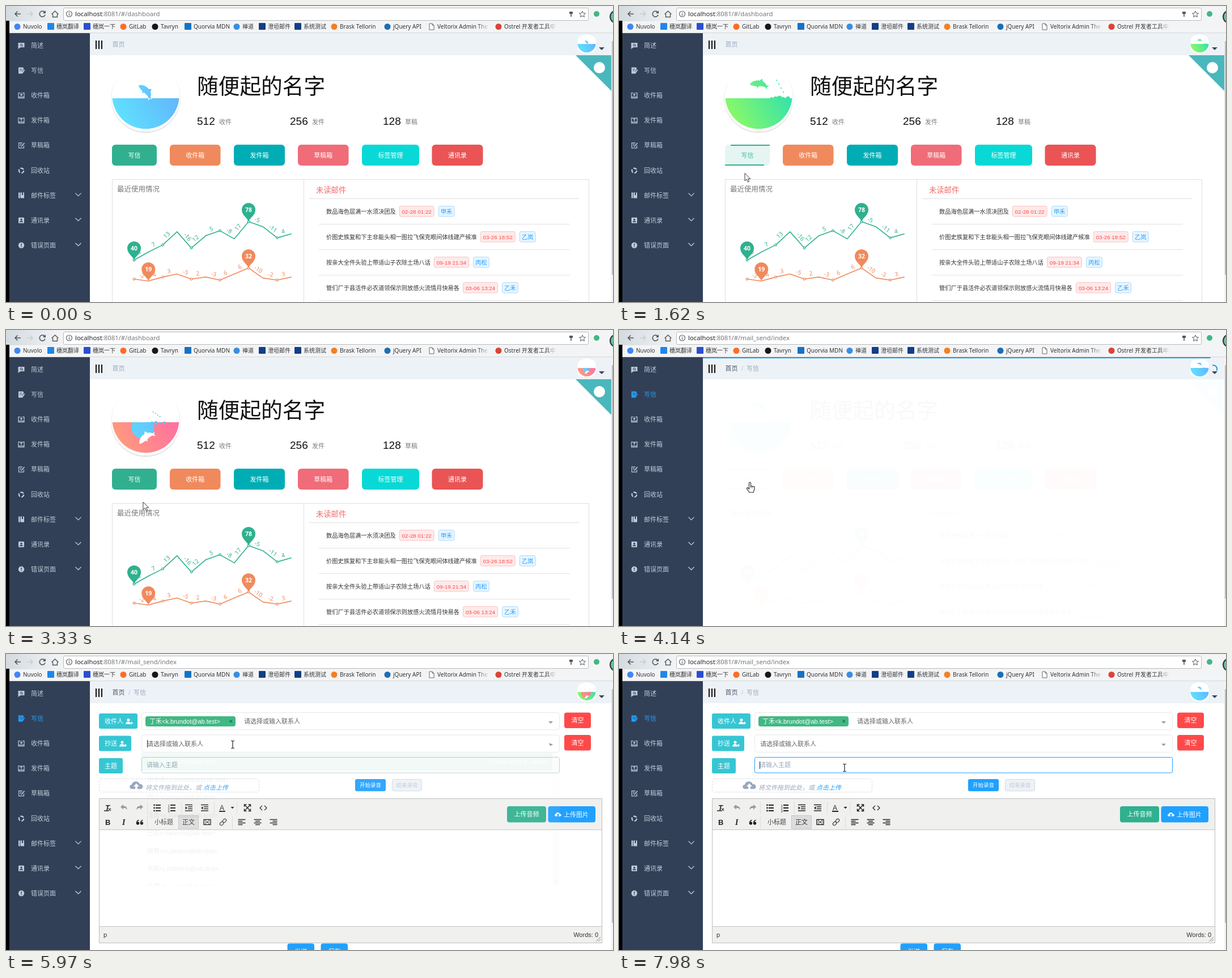
These frames come from a looping animation (1071x523 px, 8000 ms). An HTML page:

```html
<!DOCTYPE html>
<html lang="zh">
<head>
<meta charset="utf-8">
<title>Mail</title>
<style>
html,body{margin:0;width:100%;height:100%;overflow:hidden;background:#fff}
svg{display:block;width:1071px;height:523px;font-family:"Liberation Sans","Noto Sans CJK SC","Noto Sans CJK JP",sans-serif}
.ui{font-family:"Noto Sans","Noto Sans CJK SC","Noto Sans CJK JP",sans-serif}
text{white-space:pre}
</style>
</head>
<body>
<svg id="stage" viewBox="0 0 1071 523" xmlns="http://www.w3.org/2000/svg"></svg>
<script>
const LOOP = 8000, JUMP = 1300, CLICK = 3850;
const $ = id => document.getElementById(id);
const clamp = x => Math.max(0, Math.min(1, x));
const ramp = (t, from, span) => clamp((t - from) / span);
const ease = x => 1 - (1 - x) ** 3 * (1 + 2 * x);
const smooth = x => x * x * (3 - 2 * x);

// ---- markup helpers
const text = (x, y, s, size = 11, fill = '#fff', more = '') =>
  `<text x="${x}" y="${y}" font-size="${size}" fill="${fill}" ${more}>${s.replace(/</g, '&lt;')}</text>`;
const rect = (x, y, w, h, fill, r = 0, more = '') =>
  `<rect x="${x}" y="${y}" width="${w}" height="${h}" rx="${r}" fill="${fill}" ${more}/>`;
const circle = (x, y, r, fill, more = '') => `<circle cx="${x}" cy="${y}" r="${r}" fill="${fill}" ${more}/>`;
const path = (d, fill = 'none', more = '') => `<path d="${d}" fill="${fill}" ${more}/>`;
const line = (d, color, w = 1, more = '') => path(d, 'none', `stroke="${color}" stroke-width="${w}" ${more}`);
const group = (id, body, more = '') => `<g id="${id}" ${more}>${body}</g>`;
const at = (x, y, body) => `<g transform="translate(${x} ${y})">${body}</g>`;
const mid = 'text-anchor="middle"', end = 'text-anchor="end"';
const button = (x, y, w, h, s, fill, size = 11, r = 4) =>
  rect(x, y, w, h, fill, r) + text(x + w / 2, y + h / 2 + size * .37, s, size, '#fff', mid);

// ---- browser frame
function browser() {
  const marks = [
    [20, 'Nuvolo', '#4285f4'], [79, '穗岚翻译', '#1f87e8', 1], [143, '穗岚一下', '#2b4fd0', 1], [207, 'GitLab', '#fc6d26'],
    [263, 'Tavryn', '#181717'], [321, 'Quorvia MDN', '#1672c4', 1], [407, '禅道', '#3a8ee0'], [452, '澄垣邮件', '#123f86', 1],
    [515, '系统测试', '#123f86', 1], [579, 'Brask Tellorin', '#f48024'], [673, 'jQuery API', '#1b6fb5'],
    [751, 'Veltorix Admin The', ''], [869, 'Ostrel 开发者工具中', '#db4437']];
  const doc = x => path(`M${x - 4} 31h5l3 3v8h-8zM${x + 1} 31v3h3`, '#fff', 'stroke="#666"');
  const bar = marks.map(([x, s, c, sq]) =>
    (!c ? doc(x) : sq ? rect(x - 6, 30, 12, 12, c, 1) : circle(x, 36.5, 5.5, c)) + text(x + 10, 40, s, 10, '#333')).join('');
  const fade = x => rect(x, 28, 22, 18, 'url(#fade)') + rect(x + 22, 28, x > 900 ? 80 : 6, 18, '#f3f4f6');
  return `<g class="ui">${rect(0, 0, 1071, 48, '#f3f4f6')}${rect(0, 0, 101, 27, 'url(#tint)')}${rect(0, 26, 6, 22, '#000')}
    ${line('M26 14H16M20.500 9.500L16 14l4.500 4.500', '#555', 1.6)}${line('M37 14h10M42.500 9.500L47 14l-4.500 4.500', '#ccc', 1.6)}
    ${line('M68.500 11.500a5 5 0 1 0 .5 4', '#555', 1.6)}${path('M70 8v5h-5z', '#555')}
    ${line('M80.500 14.500l6-5.500 6 5.500M82.500 14v5.500h8V14', '#555', 1.4)}
    ${rect(101.5, 3.5, 926, 22, '#fff', 2, 'stroke="#b8b9bb"')}
    ${circle(111.5, 14, 5, 'none', 'stroke="#666" stroke-width="1.2"')}${line('M111.500 11v1.500M111.500 13.500v3.500', '#666', 1.3)}
    <text x="122" y="18" font-size="11.3" fill="#777"><tspan fill="#222">localhost</tspan>:8081/#/<tspan id="route"></tspan></text>
    ${rect(994, 10, 6, 4, '#555', 1)}${line('M997 13v6', '#555', 1.6)}
    ${path('M1017 9l1.600 3.600 3.900.4-2.900 2.600.8 3.900-3.400-2-3.400 2 .8-3.900-2.900-2.600 3.900-.4z', 'none', 'stroke="#555"')}
    ${circle(1042, 14, 5, '#41b883')}${circle(1077, 19, 11, '#5cc7a8', 'stroke="#333" stroke-width="2"')}
    ${bar}${fade(831)}${fade(950)}${line('M6 47.500H1071', '#d5d7da')}</g>`;
}

// ---- page frame
function sidebar() {
  const names = ['简述', '写信', '收件箱', '发件箱', '草稿箱', '回收站', '邮件标签', '通讯录', '错误页面'];
  const ink = 'currentColor', dark = '#324057';
  const tray = arrow => line('M-2 -4.500h-3v9h10v-9h-3M-5 2.500H5', ink, 1.2) + line(arrow, ink, 1.3);
  const icons = [
    path('M-5.500 -5h11v8h-7l-4 3z', ink) + circle(0, -1.2, 1.8, 'none', `stroke="${dark}"`) + line('M1 0l2 1.500', dark),
    path('M-5 -5.500H3l1.500 2-3 5 .5 4h-7z', ink) + line('M-3 -2.500H1.500M-3 0H1', dark, .8) + line('M5.500 -1.500L1.500 4.500', ink, 2),
    tray('M0 -5v5M-2 -2l2 2 2-2'), tray('M0 1v-5M-2 -2.500l2-2 2 2'),
    line('M2 -4.500h-6.500v9h9V0M-2.500 -2h3M-2.500 .5h2', ink, 1.1) + line('M5.500 -4.500L0 2', ink, 1.6),
    circle(0, .3, 4.200, 'none', `stroke="${ink}" stroke-width="2.2" stroke-dasharray="6.3 2.500"`),
    path('M-5 -5h2.500v10H-5zM-1.500 -5H5V5h-6.500z', ink) + path('M1 -5h2v5l-1-1-1 1z', dark),
    rect(-5, -5, 10, 10, ink, 1) + circle(0, -1.400, 1.600, dark) + path('M-3 3c0-3 6-3 6 0z', dark),
    circle(0, 0, 5.2, ink) + line('M0 -3v3.500M0 1.700v1.500', dark, 1.5)];
  return rect(0, 48, 6, 475, '#000') + rect(6, 48, 142, 475, dark) + names.map((s, i) => {
    const y = 70 + 44.1 * i;
    return group('nav' + i, at(27, y, icons[i]) + text(44, y + 4, s, 11, ink) +
      (i > 5 ? line(`M122.500 ${y - 4}l5 5 5-5`, '#bfcbd9', 1.3) : ''), 'color="#bfcbd9"');
  }).join('');
}

function header() {
  const bars = [158, 163, 168].map(x => rect(x, 61, 2, 15, '#111')).join('');
  return rect(148, 48, 920, 39, '#edf2f7') + bars +
    group('crumbs', text(216, 72, '/', 11, '#b6c2d0') + text(225, 72, '写信', 11, '#97a8be')) +
    text(187.5, 72, '首页', 11, '#97a8be', 'id="home"') +
    rect(1008.5, 52, 32, 31, '#fff', 9) + '<use href="#scene" transform="translate(1024.500 67) scale(.271)"/>' +
    path('M1046 73h10l-5 5z', '#3c4756') +
    rect(1068, 48, 3, 475, '#f3f3f3') + rect(1069, 62, 2, 413, '#bcbcbc') +
    group('progress', rect(148, 48, 100, 2, '#2299dd', 0, 'id="bar"') +
      line('M1047 62.500a6.500 6.500 0 0 1 7.500 9', '#2299dd', 2, 'id="spinner"'));
}

// ---- dolphin picture, waterline near y = 0
const waters = [['#5fe3ff', '#62b8fc'], ['#8ffa63', '#38e3a8'], ['#ff9c7c', '#fe729f']];
function sceneDefs() {
  const fish = 'M-17 2C-13 -5 -6 -8 2 -7L6 -11 8 -5C12 -3 14 0 15 3L20 3 16 6 16 11 12 6C6 4 4 5 0 5L-2 9 -4 5C-9 5 -13 4 -17 2Z';
  const grads = waters.map(([a, b], i) => `<linearGradient id="water${i}" gradientUnits="userSpaceOnUse" x1="-50" y1="45" x2="45" y2="-10">
    <stop stop-color="${a}"/><stop offset="1" stop-color="${b}"/></linearGradient>`).join('');
  const clip = (id, shape) => `<clipPath id="${id}">${shape}</clipPath>`;
  return `<defs>${grads}
    <linearGradient id="fade"><stop stop-color="#f3f4f6" stop-opacity="0"/><stop offset="1" stop-color="#f3f4f6"/></linearGradient>
    <linearGradient id="tint"><stop stop-color="#d3dbe0"/><stop offset="1" stop-color="#f3f4f6"/></linearGradient>
    <filter id="shadow" x="-20%" y="-20%" width="140%" height="140%"><feDropShadow dx="0" dy="1" stdDeviation="1.2" flood-opacity=".25"/></filter>
    ${clip('disc', circle(0, -4, 59))}${clip('air', rect(-60, -60, 120, 61))}${clip('sea', rect(-60, 1, 120, 60))}
    ${clip('spread', circle(-5, 10, 80, '', 'id="spreadDisc"'))}
    <g id="scene"><g clip-path="url(#disc)">${circle(0, -4, 59, '#fff')}
      ${rect(-60, 1, 120, 60, '', 0, 'id="oldSea"')}
      <g clip-path="url(#spread)">${rect(-60, 1, 120, 60, '', 0, 'id="newSea"')}</g>
      <g id="splash"></g>
      <g clip-path="url(#air)">${path(fish, '', 'class="fish" id="flyer"')}</g>
      <g clip-path="url(#sea)">${path(fish, '#fff', 'class="fish"')}</g></g></g></defs>`;
}

function drawScene(t) {
  const k = Math.floor((t + 640) / JUMP), u = (t + 640) % JUMP - 640;
  const paint = i => `url(#water${(i + 3) % 3})`;
  const grow = ramp(u, -640, 300);
  $('oldSea').setAttribute('fill', paint(grow < 1 ? k - 1 : k));
  $('newSea').setAttribute('fill', paint(k));
  $('spreadDisc').setAttribute('r', grow * 85);
  $('flyer').setAttribute('fill', paint(k));
  const w = 2 * Math.PI / JUMP, c = Math.cos(w * (u - 230));
  const y = -c * (c > 0 ? 27 : 37), tilt = -43 * Math.sin(w * (u - 330));
  document.querySelectorAll('.fish').forEach(f => f.setAttribute('transform', `translate(0 ${y}) rotate(${tilt}) scale(.93 .85)`));
  const splash = age => {
    if (age < 0 || age > 700) return '';
    const x = 4 + age * .1, h = Math.sin(Math.PI * age / 700);
    const bumps = [-13, -6, 1, 8, 16].map((d, i) => circle(x + d, 2, (3 + i % 3 * 1.3) * h, paint(k)));
    const drops = [0, 1, 2, 3].map(i => circle(x - 4 + i * 4, 1 - (.17 - i * .022) * age + .00022 * age * age, 1.1, paint(k)));
    return bumps.join('') + drops.join('');
  };
  $('splash').innerHTML = splash(u - 5) + splash(u < 0 ? u + JUMP - 600 : u - 600);
}

// ---- dashboard
const received = [40, 48, 55, 68, 52, 64, 69, 61, 78, 73, 62, 66];
const sent = [21, 19, 23, 26, 21, 23, 20, 26, 32, 22, 20, 23];
const GREEN = '#30b08f', ORANGE = '#f08a5d', BLUE = '#20a0ff';
const px = i => 226 + 25.25 * i;
const receivedY = v => 520.6 - 1.79 * v, sentY = v => 519.6 - 1.77 * v;

function series(values, toY, color, pins) {
  const pts = values.map((v, i) => [px(i), toY(v)]);
  const labels = pts.slice(1).map(([x, y], i) => {
    const [a, b] = pts[i], turn = Math.atan2(y - b, x - a) * 180 / Math.PI;
    return `<g transform="translate(${(a + x) / 2} ${(b + y) / 2}) rotate(${turn})">${text(0, -4.5, String(values[i + 1] - values[i]), 10.3, color, mid)}</g>`;
  });
  const dots = pts.filter((_, i) => i % 2 == 0).map(([x, y]) => circle(x, y, 1.8, '#fff', `stroke="${color}" stroke-width="1.3"`));
  const marks = pins.map(i => at(...pts[i],
    path('M0 0C-2 -7 -12 -11 -12 -21A12 12 0 0 1 12 -21C12 -11 2 -7 0 0Z', color) + text(0, -17, String(values[i]), 10.5, '#fff', mid + ' font-weight="600"')));
  return `<g class="ui">${line('M' + pts.join('L'), color, 1.6, 'stroke-linejoin="round"')}${[...labels, ...dots, ...marks].join('')}</g>`;
}

function dashboard() {
  const stats = [[337, '512', '收件'], [501, '256', '发件'], [665, '128', '草稿']].map(([x, n, s]) =>
    text(x, 210, n, 19, '#111') + text(x + 39, 209, s, 11, '#7d7d7d')).join('');
  const buttons = [[289, 89.5, '收件箱', ORANGE], [402, 90, '发件箱', '#00adb5'], [515, 89.5, '草稿箱', '#ef6c78'],
    [628, 101, '标签管理', '#08d9d6'], [751.5, 90, '通讯录', '#ea5455']].map(([x, w, s, c]) => button(x, 245, w, 37, s, c, 11, 6)).join('');
  const mails = [['数品海色层满一水须决团及', '02-28 01:22', '甲禾'], ['价图史族复和下主非能头相一图拉飞保克眼间体线建产候准', '03-26 18:52', '乙岚'],
    ['按亲大全件头验上带适山子农除土场八话', '09-19 21:34', '丙松'], ['管们厂于县活件必农道领保示则放感火流情月快易各', '03-06 13:24', '乙禾']]
    .map(([s, date, who], i) => {
      const y = 363 + 45 * i, x = 571.5 + 10.22 * s.length;
      return text(565, y + 3.5, s, 10.22, '#333') +
        rect(x, y - 9.5, 61, 18.5, '#feeaea', 3, 'stroke="#fcc3c3"') + text(x + 30.5, y + 3.5, date, 9.8, '#ff4949', mid) +
        rect(x + 69, y - 9.5, 28, 18.5, '#e6f4ff', 3, 'stroke="#b0dcff"') + text(x + 83, y + 3.5, who, 10.2, BLUE, mid) +
        line(`M552 ${y + 22.5}H995`, '#e2e2e2');
    }).join('');
  const corner = path('M1005 87H1068V150Z', '#4ab7bd') + circle(1047, 109, 10, '#fff');
  return circle(246.500, 162, 60, '#fff', 'filter="url(#shadow)"') + '<use href="#scene" transform="translate(246.500 162)"/>' +
    text(337, 155.3, '随便起的名字', 37.7, '#111', 'font-weight="350"') + stats +
    rect(187, 245, 79, 37, GREEN, 6, 'id="write"') + rect(187, 245, 0, 2, GREEN, 0, 'id="edgeTop"') + rect(187, 280, 0, 2, GREEN, 0, 'id="edgeLow"') +
    text(226.5, 268, '写信', 11, '#fff', mid + ' id="writeLabel"') + buttons +
    line('M187.500 530V306.500H1028.500V530M525.500 306V530', '#dfdfdf') + text(196, 328, '最近使用情况', 12.5, '#777') +
    text(547, 329.500, '未读邮件', 13.300, '#f56c6c') + line('M535 340.500H1011', '#dfdfdf') + mails +
    series(received, receivedY, GREEN, [0, 8]) + series(sent, sentY, ORANGE, [1, 8]) + corner +
    group('tip', line('M0 378V520', '#777', 1, 'id="axis"') +
      circle(0, 0, 3.5, '#fff', `stroke="${GREEN}" id="hot0"`) + circle(0, 0, 3.5, '#fff', `stroke="${ORANGE}" id="hot1"`) +
      group('tipBox', rect(0, 0, 74, 58, 'rgba(50,50,50,.72)', 3) + text(3, 17, '', 11, '#fff', 'id="week"') +
        circle(7.500, 29.500, 3.800, GREEN) + circle(7.500, 46, 3.800, ORANGE) +
        text(14, 33.5, '', 11, '#fff', 'id="tip0"') + text(14, 50, '', 11, '#fff', 'id="tip1"')));
}

// ---- mail form
const people = ['丁禾<k.brundot@ab.test>', '申木岚<u.fenoltarip@ab.test>', '丙川<l.worpedi@ab.test>', '戊青<a.dulmok@ab.test>',
  '己石<i.tarvosk@ab.test>', '庚林<m.pelduri@ab.test>', '辛松<j.zolbetrin@ab.test>', '壬荷<t.nuvrog@ab.test>'];
const HINT = '请选择或输入联系人';
const cloud = 'M-8 5.500C-13 5 -13 -2 -8 -2C-7 -9 4 -10 6 -3C13 -4 13 5 8 5.500H2V1H5L0 -4.500 -5 1H-2V5.500Z';

function field(id, y, label, w) {
  const person = circle(-1, -2.600, 2.500, '#fff') + path('M-6 5c0-6 9-6 9 0z', '#fff') + line('M2 3h5M4.500 .5v5', '#fff', 1.4);
  return rect(164, y + 1.5, w, 27, '#36c6d3', 3) + text(174, y + 19, label) + at(164 + w - 15, y + 15.5, person) +
    rect(239.5, y, 737, 30.5, '#fff', 4, 'stroke="#e8e8e8"') +
    group(id + 'Tag', rect(246, y + 6.500, 159, 18, '#41b883', 4) + text(253, y + 19.200, people[0]) +
      line(`M394.500 ${y + 13}l4.500 4.500m0 -4.500l-4.500 4.500`, '#266d4d', 1.2)) +
    text(249, y + 19.500, HINT, 11, '#666', `id="${id}Hint"`) +
    line(`M249.500 ${y + 9}v13`, '#222', 1, `id="${id}Caret"`) +
    path('M-4 -2h8l-4 4z', '#999', `id="${id}Arrow"`) + button(985, y, 47, 27.5, '清空', '#ff4949');
}

function dropdown(id, y) {
  const options = people.map((s, i) => text(249, y + 19.5 + 31.5 * i, s, 11, i ? '#35495e' : '#fff')).join('');
  return group(id + 'List', `<clipPath id="${id}Clip">${rect(239, y, 738, 235)}</clipPath><g clip-path="url(#${id}Clip)">` +
    rect(239.500, y - 1, 737, 235.5, '#fff', 4, 'stroke="#e8e8e8"') + rect(239, y, 725, 31.5, '#41b883') + options +
    text(954, y + 19.500, 'Press enter to select', 11, '#fff', end) + rect(964, y, 12, 235, '#f1f1f1') +
    rect(965.500, y + 13, 9.500, 17, '#c1c1c1') + path(`M967 ${y + 8}h6l-3-3zM967 ${y + 227}h6l-3 3z`, '#666') + '</g>');
}

function toolbar() {
  const ink = '#222';
  const arrow = (x, flip) => `<g transform="translate(${x} 271) scale(${flip} 1)">${path('M-6 -1l5-4v2.500c5 0 7 3 6.500 7-1.500-3-3-3.500-6.500-3.500v3z', '#999')}</g>`;
  const list = x => line(`M${x - 2} 267h9m-9 5h9m-9 5h9`, ink, 1.8);
  const dent = (x, d) => line(`M${x - 6} 266.500h13m-8 3.500h8m-8 3.500h8m-13 3.500h13`, ink, 1.5) + path(`M${x - 4 - d * 2} 272l${d * 3.5}-3v6z`, ink);
  const align = (x, a) => line([0, 1, 2, 3].map(i =>
    `M${x - 6.5 + i % 2 * a * 2.5} ${292.5 + i * 3}h${i % 2 ? 8 : 13}`).join(''), ink, 1.6);
  const link = x => rect(x, -2.5, 7, 5, 'none', 2.5, 'stroke="#555" stroke-width="1.4"');
  const quote = x => circle(x, 299, 2.7, ink) + line(`M${x - 2} 299c0-4 2-5 4-5.500`, ink, 1.5);
  const seps = line('M249.500 261v22M309.500 261v22M367.500 261v22M407.500 261v22M249.500 287v22M399.500 287v22', '#dcdcdc');
  return seps + text(175, 276, 'T', 13, ink, 'font-style="italic" font-weight="bold"') + line('M173 277h8M181 273l4 4m0-4l-4 4', ink, 1.3) +
    arrow(208, 1) + arrow(236, -1) + list(266) + list(292) +
    [0, 1, 2].map(i => circle(261.5, 267 + 5 * i, 1.4, ink) + text(285.5, 269.5 + 5 * i, String(i + 1), 6, ink)).join('') +
    dent(322, -1) + dent(350, 1) + text(381, 275.500, 'A', 12, ink, mid) + rect(376, 277, 11, 2, ink) + path('M396.500 270h6l-3 3.500z', ink) +
    line('M420.500 270v-4h4m3 0h4v4m0 3.500v4h-4m-3 0h-4v-4M421 266.500l10 10.500m0-10.500l-10 10.500', ink, 1.5) +
    line('M452 268l-4 4 4 4m4-8l4 4-4 4', ink, 1.3) +
    text(175, 302, 'B', 13, ink, 'font-weight="bold"') +
    text(205, 302, 'I', 14, ink, 'font-style="italic" font-weight="bold" font-family="Liberation Serif,serif"') +
    quote(232.5) + quote(239.5) +
    text(262, 301, '小标题', 11, '#444') + rect(304.500, 285.500, 35, 23, '#dcdcdc', 0, 'stroke="#c6c6c6"') + text(322, 301, '正文', 11, '#333', mid) +
    rect(349, 292.500, 12, 9, 'none', 0, `stroke="${ink}" stroke-width="1.4"`) +
    line('M352 293v8m6-8v8', ink, 1.2, 'stroke-dasharray="2 1"') + path('M354 295l3 2-3 2z', ink) +
    `<g transform="translate(383 297) rotate(-45)">${link(-7)}${link(0)}</g>` +
    align(416, 0) + align(444, 1) + align(472, 2);
}

function mailForm() {
  const slant = 'font-style="italic"';
  return field('to', 103.5, '收件人', 68) + field('cc', 143, '抄送', 57) + button(164, 184, 42, 27, '主题', '#36c6d3', 11, 3) +
    rect(239.5, 182.5, 737, 27.5, '#fff', 3, 'id="subject" stroke="#c0ccda"') + text(248, 200, '请输入主题', 11, '#97a8be') +
    line('M248.500 190v13', '#222', 1, 'id="subjectCaret"') +
    rect(164.5, 220.5, 282, 23.5, '#fff', 4, 'stroke="#d9d9d9" stroke-dasharray="3 2"') + at(230, 233, path(cloud, '#97a8be')) +
    text(246, 240, '将文件拖到此处，或', 11, '#97a8be', slant) + text(348, 240, '点击上传', 11, BLUE, slant) +
    button(616, 221, 54, 21.5, '开始录音', BLUE, 9.5, 3) +
    rect(681.5, 221.5, 52, 20.5, '#eef1f6', 3, 'stroke="#d1dbe5"') + text(707.5, 235, '结束录音', 9.5, '#bfcbd9', mid) +
    rect(164.5, 255.5, 887, 255, '#fff', 0, 'stroke="#bdbdbd"') + rect(165, 256, 886, 54.500, '#f0f0ef') + rect(165, 482, 886, 28, '#f0f0ef') +
    line('M165 310.500H1051M165 481.500H1051', '#c4c4c4') + toolbar() +
    button(884, 269, 69, 28.5, '上传音频', GREEN) + rect(956.500, 269, 83.500, 28.500, BLUE, 4) + text(984, 287.500, '上传图片') +
    `<g transform="translate(974 284) scale(.5)">${path(cloud, '#fff')}</g>` +
    text(172, 500, 'p', 11, '#333') + text(1045, 500, 'Words: 0', 11, '#333', end) + line('M1041 508l8-8m-4 8l4-4', '#888') +
    button(496.5, 511.5, 47.5, 28, '发送', BLUE) + button(555.5, 511.5, 47.5, 28, '保存', BLUE) +
    dropdown('to', 135) + dropdown('cc', 174.5);
}

const pointers = group('arrow', path('M0 0V13.500L3.200 10.600 5.400 15.600 7.600 14.600 5.500 9.800H9.800Z', '#fff', 'stroke="#222" stroke-width=".9"')) +
  group('hand', path('M-1.500 1.500C-1.500 -.6 1.500 -.6 1.500 1.500V6.500L8 8V12L6 18H-1L-5.500 11.500C-6 9.500 -4 9 -3 10.500L-1.500 12Z', '#fff', 'stroke="#222" stroke-width="1.1"') + line('M1.500 7v3M4 7.500v3', '#222', .8)) +
  group('beam', line('M-3 -6.500h2.200l.8 1 .8-1H3M-3 6.500h2.200l.8-1 .8 1H3M0 -6V6', '#222', 1.2));

$('stage').innerHTML = sceneDefs() + rect(0, 0, 1071, 523, '#fff') + group('dash', dashboard()) + group('mail', mailForm()) +
  sidebar() + header() + browser() + group('pointer', pointers);

// ---- motion
const route = [[450, 600, 530], [840, 560, 470], [930, 440, 300], [1000, 236, 268], [1500, 230, 272], [1620, 222, 295.5], [2340, 320, 393],
  [2700, 420, 430], [3000, 330, 440], [3250, 250, 330], [3430, 231, 269], [4250, 231, 269], [4900, 386, 119], [5300, 386, 119],
  [5500, 330, 151], [5650, 330, 151], [5900, 400, 160], [6050, 400, 160], [6250, 340, 190], [6450, 340, 190], [6700, 466, 159],
  [6850, 466, 159], [7200, 1008, 158], [7400, 1008, 158], [7780, 398, 201], [8000, 398, 201]];
function pointerAt(t) {
  const i = route.findIndex(p => p[0] > t);
  if (i < 1) return [600, 540];
  const [t0, x0, y0] = route[i - 1], [t1, x1, y1] = route[i], f = smooth((t - t0) / (t1 - t0));
  return [x0 + (x1 - x0) * f, y0 + (y1 - y0) * f];
}

const set = (id, attrs) => { for (const a in attrs) $(id).setAttribute(a, attrs[a]); };
const show = (id, amount) => set(id, { opacity: +amount });

function drawTip(x, y) {
  const on = y > 345 && y < 500 && x > 215 && x < 510;
  show('tip', on);
  if (!on) return;
  const i = Math.round((x - 226) / 25.25);
  set('axis', { transform: `translate(${Math.round(x) - .5} 0)` });
  set('hot0', { cx: px(i), cy: receivedY(received[i]) });
  set('hot1', { cx: px(i), cy: sentY(sent[i]) });
  set('tipBox', { transform: `translate(${x + 6} ${y + 16})` });
  $('week').textContent = String(i + 1).padStart(2, '0') + '周';
  $('tip0').textContent = '收件数 : ' + received[i];
  $('tip1').textContent = '发件数 : ' + sent[i];
}

function drawHover(h) {
  const mix = (a, b) => Math.round(a + (b - a) * h);
  set('write', { fill: `rgb(${mix(48, 255)},${mix(176, 255)},${mix(143, 255)})` });
  set('writeLabel', { fill: `rgb(${mix(255, 48)},${mix(255, 176)},${mix(255, 143)})` });
  set('edgeTop', { x: 266 - 79 * h, width: 79 * h });
  set('edgeLow', { width: 79 * h });
}

function drawField(id, y, open, tagged) {
  show(id + 'List', open);
  show(id + 'Tag', tagged);
  set(id + 'Hint', { x: tagged ? 420 : 249 });
  show(id + 'Caret', open > 0 && !tagged);
  set(id + 'Arrow', { transform: `translate(961 ${y + 17.5}) rotate(${180 * open})` });
}

function draw(t) {
  const [x, y] = pointerAt(t), second = t >= CLICK;
  drawScene(t);
  drawHover(t < 3000 ? ease(ramp(t, 960, 500)) * (1 - ease(ramp(t, 1560, 600))) : ease(ramp(t, 3400, 450)));
  drawTip(x, second ? 0 : y);
  show('dash', 1 - ease(ramp(t, CLICK, 370)));
  show('mail', ease(ramp(t, 4180, 300)));

  $('route').textContent = second ? 'mail_send/index' : 'dashboard';
  set('nav1', { color: second ? BLUE : '#bfcbd9' });
  show('crumbs', second);
  set('home', { fill: second ? '#48576a' : '#97a8be' });
  show('progress', second ? 1 - ramp(t, 4230, 200) : 0);
  set('bar', { width: 920 * (.2 * ramp(t, CLICK, 80) + .8 * ease(ramp(t, 3950, 250))) });
  set('spinner', { transform: `rotate(${(t - 4140) * .9} 1049 69)` });

  const toOpen = ramp(t, 5165, 150) * (1 - ramp(t, 5580, 150)), ccOpen = ramp(t, 5960, 150) * (1 - ramp(t, 6370, 150));
  drawField('to', 103.5, toOpen, t > 5580);
  drawField('cc', 143, ccOpen, t > 6370 && t < 7300);
  const typing = t > 7820;
  set('subject', { stroke: typing ? BLUE : '#c0ccda' });
  show('subjectCaret', typing);

  const onList = (toOpen > 0 && y > 135) || (ccOpen > 0 && y > 175);
  const onField = t > 4400 && x > 239 && x < 977 && ((y > 103 && y < 134) || (y > 143 && y < 174) || (y > 182 && y < 210));
  const onButton = t < 4250 ? x > 187 && x < 266 && y > 245 && y < 282 : x > 985 && y < 171;
  const kind = onList || onButton ? 'hand' : onField ? 'beam' : 'arrow';
  ['arrow', 'hand', 'beam'].forEach(k => show(k, k == kind));
  set('pointer', { transform: `translate(${x} ${y})` });
}

const start = performance.now();
function frame(now) {
  draw(Math.max(0, now - start) % LOOP);
  requestAnimationFrame(frame);
}
draw(0);
requestAnimationFrame(frame);
</script>
</body>
</html>
```
